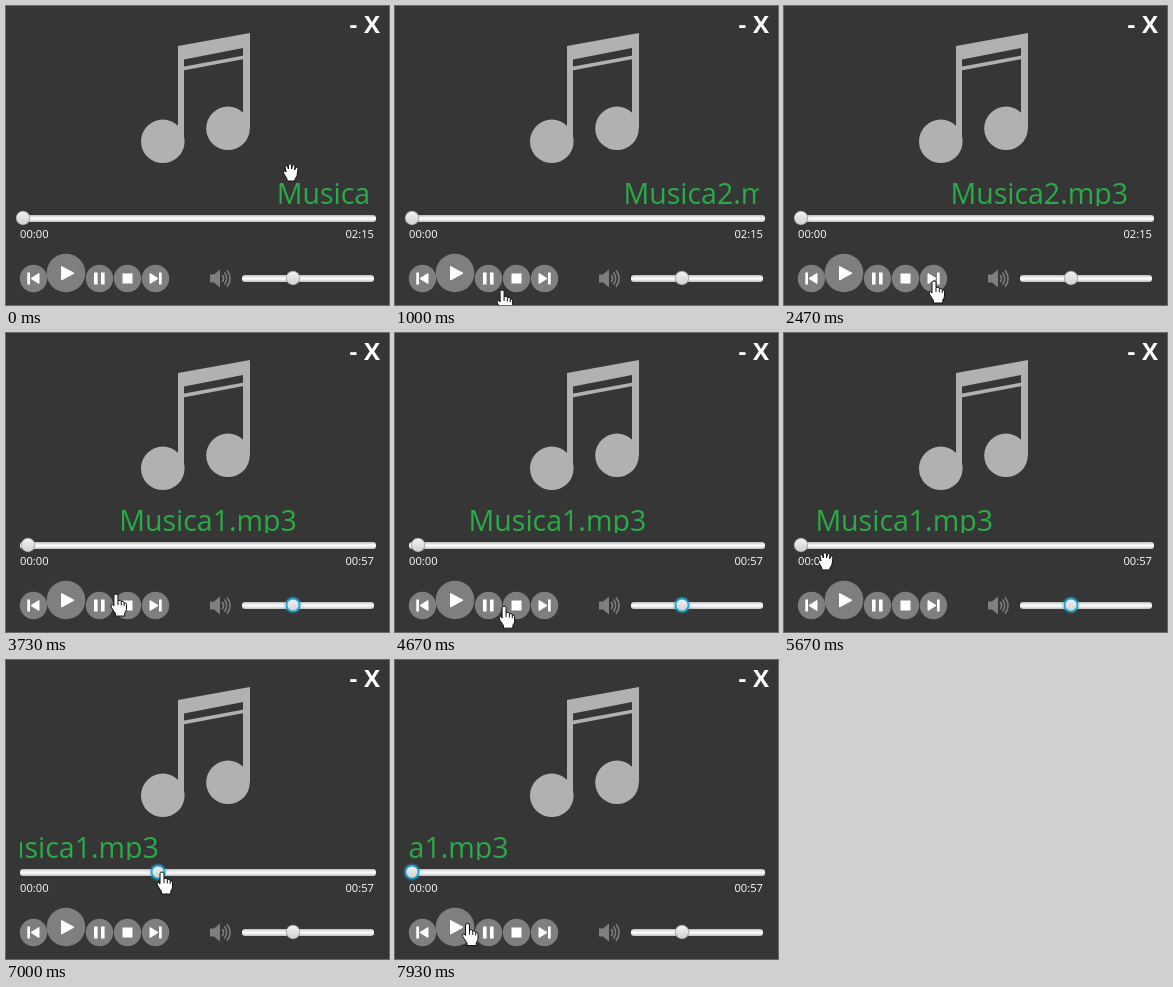
These frames come from a looping animation (383 px wide and 299 px high, 8 s). An HTML page:

```html
<!DOCTYPE html>
<html lang="en">
<head>
<meta charset="utf-8">
<title>Music player</title>
<style>
  html, body { margin: 0; width: 100%; height: 100%; overflow: hidden; background: #363636; }
  svg { display: block; width: 100vw; height: 100vh; font-family: "Open Sans", "Noto Sans", sans-serif; }
  .note { fill: #b1b1b1; }
  .disc { fill: #7f7f7f; }
  .icon, .time, .window { fill: #fff; }
  .icon path { stroke: #fff; stroke-width: 1; stroke-linejoin: round; }
  .time { font-size: 11.2px; }
  .window { font-size: 24px; font-weight: 700; }
  #title { fill: #2bab48; font-size: 28.5px; }
  .cursor path { fill: #fff; stroke: #111; stroke-width: 1; stroke-linejoin: round; }
  .cursor .crease { fill: none; }
  .ring { fill: none; stroke: #1aa3d4; stroke-width: 1.6; }
  .glow { fill: none; stroke: #1aa3d4; stroke-width: 2; opacity: .3; }
</style>
</head>
<body>
<svg viewBox="0 0 383 299" preserveAspectRatio="none">
  <defs>
    <linearGradient id="track" x2="0" y2="1">
      <stop offset="0" stop-color="#bababa"/>
      <stop offset=".3" stop-color="#ececec"/>
      <stop offset=".55" stop-color="#fff"/>
      <stop offset="1" stop-color="#bdbdbd"/>
    </linearGradient>
    <linearGradient id="knob" x2="0" y2="1">
      <stop offset="0" stop-color="#f2f2f2"/>
      <stop offset="1" stop-color="#d2d2d2"/>
    </linearGradient>
    <clipPath id="pane"><rect x="14" y="170" width="350" height="30"/></clipPath>
    <g id="thumb">
      <circle r="7.2" fill="#a2a2a2"/>
      <circle r="6.3" fill="url(#knob)"/>
    </g>
  </defs>

  <rect width="383" height="299" fill="#363636"/>
  <text class="window" x="343.5" y="26.5">-</text>
  <text class="window" x="358" y="26.5">X</text>

  <g class="note">
    <path d="M172 40L244 27V122H237V42L178 53.5V135H172Z"/>
    <path d="M177 60.8L238 49.5V53L177 64.5Z"/>
    <circle cx="156.8" cy="135.3" r="21.8"/>
    <circle cx="222" cy="122.3" r="21.8"/>
  </g>

  <g clip-path="url(#pane)"><text id="title" y="198.3"></text></g>

  <rect x="14" y="209" width="356" height="7" rx="3" fill="url(#track)"/>
  <rect x="236" y="269" width="132" height="7" rx="3" fill="url(#track)"/>
  <g id="seek"><use href="#thumb"/><g class="focus"><circle class="glow" r="7.8"/><circle class="ring" r="6.4"/></g></g>
  <g id="volume" transform="translate(287 272)"><use href="#thumb"/><g class="focus"><circle class="glow" r="7.8"/><circle class="ring" r="6.4"/></g></g>

  <text class="time" x="14" y="231.5">00:00</text>
  <text class="time" id="total" x="368" y="231.5" text-anchor="end"></text>

  <g class="disc">
    <circle cx="27.5" cy="272.5" r="13.7"/>
    <circle cx="60" cy="267" r="19.3"/>
    <circle cx="93.5" cy="272.5" r="13.7"/>
    <circle cx="121.5" cy="272.5" r="13.7"/>
    <circle cx="149.5" cy="272.5" r="13.7"/>
    <path d="M204 268.5H208L214 263.5V281.5L208 276.5H204Z"/>
  </g>
  <g fill="none" stroke="#7f7f7f" stroke-width="1.6" stroke-linecap="round">
    <path d="M216.5 269.5Q218.6 272.5 216.5 275.5M218.8 267Q222.6 272.5 218.8 278M221.3 264.8Q227 272.5 221.3 280.2"/>
  </g>
  <g class="icon">
    <path d="M33 267.5V277.5L25 272.5Z"/>
    <rect x="21.3" y="266.5" width="2.7" height="12"/>
    <path d="M55.5 260.5V274L68 267.2Z"/>
    <rect x="88" y="266.5" width="3.6" height="12"/>
    <rect x="95" y="266.5" width="3.6" height="12"/>
    <rect x="116.5" y="267.5" width="10" height="10"/>
    <path d="M144 267.5V277.5L152 272.5Z"/>
    <rect x="153" y="266.5" width="2.7" height="12"/>
  </g>

  <g class="cursor" id="pointer">
    <path d="M-2 1.6Q-2 0 0 0Q2 0 2 1.6V6.5Q5 5.6 5.3 7.4Q8 6.8 8.2 8.8Q10.5 8.4 10.5 10.5V15Q10.5 17 8.8 19V22H-.5V19.5L-4.8 13Q-5.6 10.2 -3.6 10.4L-2 12Z"/>
    <path class="crease" d="M2 6.5V11M5.3 7.4V11.4M8.2 8.8V12"/>
  </g>
  <g class="cursor" id="hand">
    <path d="M-4 9V7L-7.5 1Q-8.3 -1.5 -6 -1L-4.8 0L-6 -5Q-5.5 -7.5 -3.6 -6L-2.6 -3V-7Q-1 -9.5 .6 -7V-3L1.6 -7Q3.6 -8.5 4 -6L3.6 -2L5 -5Q7.5 -5.5 7 -3L6 4L4 7V9Z"/>
  </g>
</svg>
<script>
  const LOOP = 8000;
  const NEXT = 2700, PLAY = 2900, PAUSE = 3900, STOP = 5270, GRAB = 6200, REPLAY = 7850;
  const REST = 17;

  // Cursor stops: time, x, y
  const path = [
    [0, 285, 166], [70, 285, 166], [500, 200, 225], [930, 93, 282], [1000, 107, 284],
    [1500, 150, 275], [3300, 150, 275], [3730, 110, 261], [3930, 95, 271], [4400, 95, 271],
    [4900, 121, 275], [STOP, 121, 275], [5670, 42, 228], [5900, 21, 212], [GRAB, 21, 212],
    [6900, 156, 212], [7050, 156, 212], [7700, 72.5, 263.5], [LOOP, 72.5, 263.5]
  ];
  const el = id => document.getElementById(id);
  const show = (node, on) => node.setAttribute("visibility", on ? "visible" : "hidden");
  const move = (node, x, y) => node.setAttribute("transform", `translate(${x} ${y})`);
  const between = (t, from, to) => t >= from && t < to;

  function cursorAt(t) {
    const i = path.findIndex(p => p[0] > t);
    const [t0, x0, y0] = path[i - 1], [t1, x1, y1] = path[i];
    const k = (t - t0) / (t1 - t0);
    return [x0 + (x1 - x0) * k, y0 + (y1 - y0) * k];
  }

  function seekAt(t, cursorX) {
    if (between(t, PLAY, STOP)) return REST + (Math.min(t, PAUSE) - PLAY) * .0061;
    if (between(t, GRAB, REPLAY)) return Math.min(t, 7050) === t ? cursorX - 4 : 152;
    return REST;
  }

  function draw(t) {
    const [x, y] = cursorAt(t);
    const open = t < 700 || between(t, 5400, 5850);
    const first = t >= NEXT;
    el("title").textContent = first ? "Musica1.mp3" : "Musica2.mp3";
    el("title").setAttribute("x", 270.7 - t * .0422);
    el("total").textContent = first ? "00:57" : "02:15";
    move(el("seek"), seekAt(t, x), 212);
    show(el("seek").querySelector(".focus"), t >= GRAB);
    show(el("volume").querySelector(".focus"), between(t, NEXT, GRAB));
    for (const id of ["pointer", "hand"]) {
      move(el(id), x, y);
      show(el(id), (id === "hand") === open);
    }
  }

  const start = performance.now();
  function tick() {
    draw((performance.now() - start) % LOOP);
    requestAnimationFrame(tick);
  }
  tick();
</script>
</body>
</html>
```
